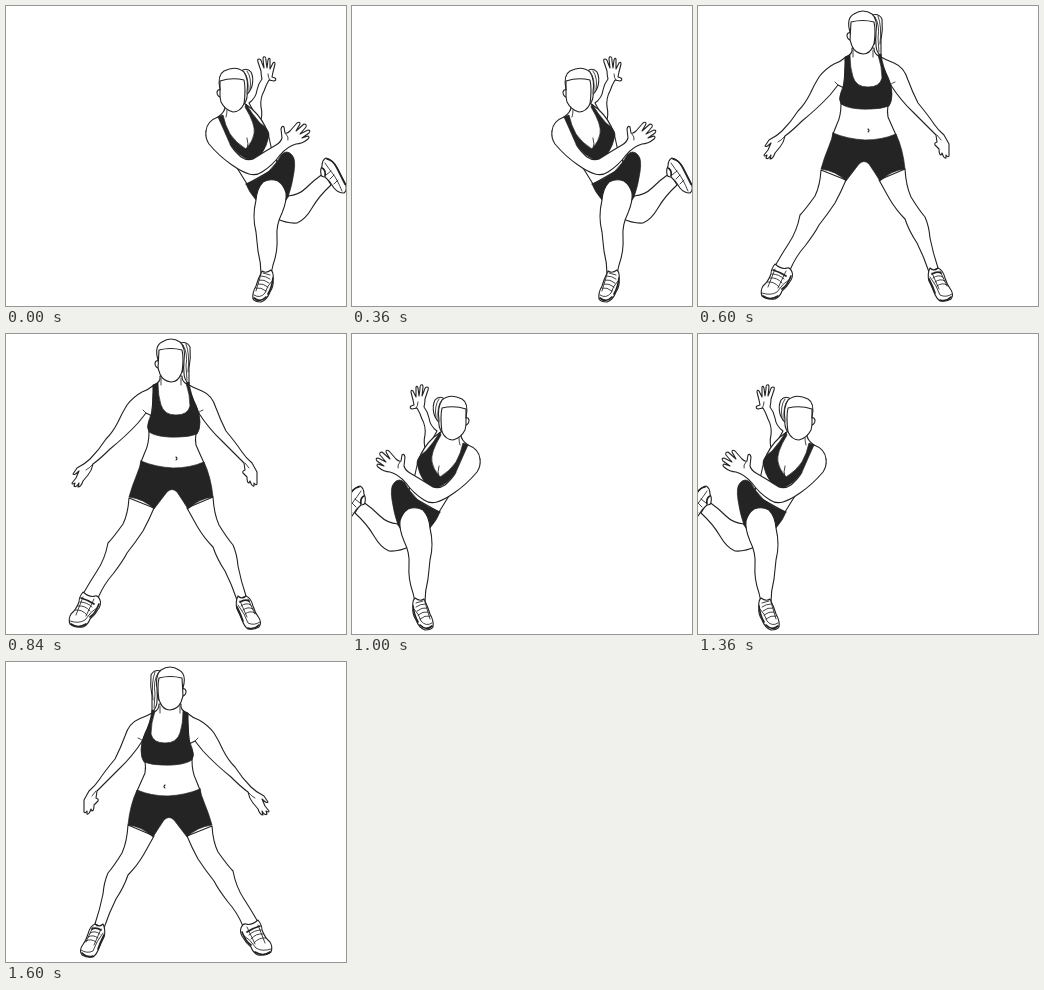
These frames come from a looping animation (340x300 px, 2 s). An HTML page:

```html
<!DOCTYPE html>
<html lang="en">
<head>
<meta charset="utf-8">
<title>Skater jumps</title>
<style>
  html, body { margin: 0; width: 100%; height: 100%; overflow: hidden; background: #fff; }
  svg { display: block; width: 340px; height: 300px; }
  path { fill: #fff; stroke: #222; stroke-width: 1.1; stroke-linecap: round; stroke-linejoin: round; }
  .dark { fill: #242424; stroke-width: .7; }
  .line { fill: none; }
  .fine { fill: none; stroke-width: .85; }
  .bold { fill: none; stroke-width: 1.7; }
</style>
</head>
<body>
<svg viewBox="0 0 340 300">
  <g id="lunge">
    <!-- back leg and shoe -->
    <path d="M282 190Q293 189 300 182Q308 174 318 167L325 179Q313 190 306 202Q299 214 291 217Q282 218 269 212Z"/>
    <path d="M315 168Q314 164 316 160Q316 154 320 152Q326 153 331 162L339 177Q342 184 338 187Q332 187 328 182Q324 175 319 171Q315 171 315 168Z"/>
    <path class="bold" d="M321 153Q327 154 331 162L339 178M316 162Q320 164 319 170"/>
    <path class="fine" d="M319 157Q323 163 327 168T336 185M320 169L325 165M324 173L328 169M328 178L332 174"/>
    <!-- raised arm -->
    <path d="M243 97Q250 92 251 84Q252 78 256 73Q255 69 255 65L252 56Q251 53 253 53Q255 53 256 57L258 62L257 53Q257 50 259 51Q260 51 260 55L261 62L262 54Q263 51 264 53L264 63L267 57Q269 55 269 58L267 66L266 71L269 72Q271 74 268 75L263 74Q260 79 258 85Q254 92 255 101Q257 109 254 117Z"/>
    <path class="fine" d="M262 68Q262 72 264 74"/>
    <!-- torso -->
    <path d="M219 101Q219 106 212 111Q201 115 200 125Q204 145 228 157L241 178L273 160L266 145L262 127Q257 113 246 103L238 97Z"/>
    <path class="dark" d="M212 111L217 109Q219 119 224 128Q230 137 240 143Q247 135 248 128Q250 119 239 101L240 98Q246 108 254 117Q263 123 263 129Q261 140 256 147Q250 154 243 154Q231 149 224 138Q217 122 212 111Z"/>
    <path class="fine" d="M241 143Q243 138 241 132M221 104Q221 108 220 111"/>
    <!-- shorts -->
    <path class="dark" d="M240 178Q253 173 262 166Q271 157 275 149Q281 143 286 149Q290 153 288 166Q286 180 282 191L278 197L250 194Q243 186 240 178Z"/>
    <!-- front leg and shoe -->
    <path d="M250 194Q251 182 257 176Q264 172 272 175Q278 179 280 187Q281 195 276 207Q270 219 271 231Q272 245 267 259L265 268L255 268Q255 257 252 245Q251 236 250 226Q246 211 250 194Z"/>
    <path class="fine" d="M279 184Q283 187 282 191"/>
    <path d="M256 265Q252 273 250 280Q246 287 247 293Q249 296 255 296Q261 294 264 286Q268 280 267 273Q268 267 265 264Q260 268 256 265Z"/>
    <path class="bold" d="M248 292Q254 297 260 291M267 272Q266 281 262 288"/>
    <path class="fine" d="M248 289Q254 293 259 287Q261 280 266 275M255 270Q260 270 264 273M253 274Q258 273 263 277M252 278Q257 277 262 281M250 282Q255 281 260 285M255 268L250 285M257 267L264 269"/>
    <!-- front arm -->
    <path d="M200 125Q199 132 203 138Q213 150 226 159Q236 166 243 168Q250 170 256 166Q267 159 274 149Q282 140 290 138Q296 138 302 133Q304 131 302 130L296 132L303 127Q305 124 302 124L294 128L300 121Q301 118 298 118L290 125L294 118Q294 115 291 117L284 125Q281 128 279 127L278 121Q276 119 275 123L276 132Q275 136 270 139Q258 146 247 153Q241 155 235 151Q227 144 224 138"/>
    <path class="fine" d="M280 128Q283 131 282 134"/>
    <!-- head -->
    <path d="M235 65Q241 61 245 66Q248 72 246 80Q244 86 240 89L236 82Z"/>
    <path class="fine" d="M238 66Q243 71 242 85M241 65Q246 72 244 83"/>
    <path d="M214 83Q211 69 218 65Q230 59 238 66Q243 74 241 86Q242 93 238 98Q234 106 227 106Q219 104 215 96L214 91Q211 90 211 86Q212 83 214 84Z"/>
    <path class="line" d="M214 91L214 75Q226 71 238 74Q240 83 238 98"/>
  </g>
  <g id="stand">
    <!-- arms -->
    <path d="M148 51Q142 56 136 58Q127 63 121 71Q116 79 112 88Q107 98 100 105Q93 116 84 125Q79 130 71 134L67 140Q68 142 73 137L70 144L66 149Q66 151 69 149L68 152Q70 154 73 149L72 153Q75 153 77 147L82 141Q86 136 87 130Q94 125 104 115Q120 102 132 89L140 79L146 82Z"/>
    <path d="M181 50Q188 54 196 57Q206 61 210 74Q214 85 220 97Q230 109 236 118Q240 124 246 129L251 138L251 150Q250 152 248 149L248 152Q246 153 244 147L243 149Q241 149 241 143L237 139Q236 137 239 136L238 129Q228 119 216 107Q203 95 192 78Z"/>
    <path class="fine" d="M87 130Q84 134 80 136M239 129L243 134M192 79Q194 77 197 76M140 79L137 76"/>
    <!-- ponytail -->
    <path d="M174 9Q181 7 184 13Q185 24 183 34Q183 42 183 50Q178 46 178 39L177 20Z"/>
    <path class="fine" d="M177 11Q182 19 180 32L181 46M180 10Q184 20 182 38"/>
    <!-- torso -->
    <path d="M154 42Q155 48 148 51L146 77L143 98Q143 110 139 118L135 128L135 136L198 138L198 129Q193 118 190 111Q189 106 190 99L191 78L181 50Q176 48 176 42Z"/>
    <path class="fine" d="M155 44L155 51M175 44L175 51"/>
    <path class="dark" d="M147 51L152 49Q152 62 155 71Q158 81 170 81Q182 81 184 72Q184 61 180 49L183 48Q185 62 190 71Q194 79 194 88Q194 96 191 100Q183 103 173 103Q152 104 143 98Q140 93 143 86Q147 78 147 68Z"/>
    <path class="line" d="M170 123Q172 125 170 126"/>
    <!-- legs -->
    <path d="M123 164Q122 180 117 190Q107 204 102 209Q99 225 91 237Q82 251 76 262L92 264Q98 250 107 240Q117 227 121 219Q129 209 137 197Q143 186 148 174Z"/>
    <path d="M207 163Q208 180 213 191Q221 204 227 211Q231 220 232 232Q235 247 240 262L231 266Q226 251 219 237Q211 225 207 213Q198 204 191 192L181 174Z"/>
    <path class="dark" d="M135 127Q149 133 167 134Q184 134 198 128Q205 143 207 163Q194 164 182 175Q177 167 171 158Q166 153 161 158L148 175Q138 165 123 163Q126 152 131 140Q134 133 135 127Z"/>
    <!-- shoes -->
    <path d="M77 258Q73 263 73 268Q70 276 65 280Q62 285 64 290Q69 294 77 293Q82 291 84 285Q89 281 91 277Q96 271 94 266Q92 261 89 262Q84 264 77 258Z"/>
    <path class="bold" d="M65 290Q72 295 80 290M93 270Q89 280 84 283M75 264Q82 266 88 270"/>
    <path class="fine" d="M64 287Q73 290 79 286Q85 277 92 273M74 268Q81 268 86 273M72 272Q79 271 84 277M69 276Q76 275 81 281M77 263L70 281M88 265L80 282"/>
    <path d="M232 262Q229 268 231 275Q234 281 236 286Q238 292 242 295Q248 296 253 293Q256 289 253 284Q249 279 247 272Q245 264 240 262Q236 266 232 262Z"/>
    <path class="bold" d="M231 273Q235 281 237 287M242 294Q248 296 253 291M234 268Q239 265 243 267"/>
    <path class="fine" d="M232 271Q239 280 242 289Q248 292 254 288M235 272Q240 268 245 271M237 276Q242 272 247 275M239 280Q244 276 249 279M234 267L241 283M242 265L249 280"/>
    <!-- head -->
    <path d="M152 26Q148 12 156 8Q165 2 174 8Q180 13 178 27Q178 36 175 40Q172 48 165 48Q157 47 154 40L152 34Q149 33 149 29Q150 26 152 27Z"/>
    <path class="line" d="M152 34L153 16Q165 13 176 16Q178 25 176 38"/>
  </g>
</svg>
<script>
  const LOOP = 2000;
  const steps = [
    { at: 0, pose: "lunge", flip: false },
    { at: 600, pose: "stand", flip: false },
    { at: 1000, pose: "lunge", flip: true },
    { at: 1600, pose: "stand", flip: true }
  ];
  // Each pose mirrors about half of its span.
  const spans = { lunge: 328, stand: 329 };
  const start = performance.now();

  function show({ pose, flip }) {
    for (const id in spans) {
      const g = document.getElementById(id);
      g.style.display = id === pose ? "" : "none";
      g.setAttribute("transform", flip ? `matrix(-1 0 0 1 ${spans[id]} 0)` : "");
    }
  }

  function tick() {
    const t = (performance.now() - start) % LOOP;
    show(steps.findLast(s => s.at <= t));
    requestAnimationFrame(tick);
  }
  show(steps[0]);
  requestAnimationFrame(tick);
</script>
</body>
</html>
```
